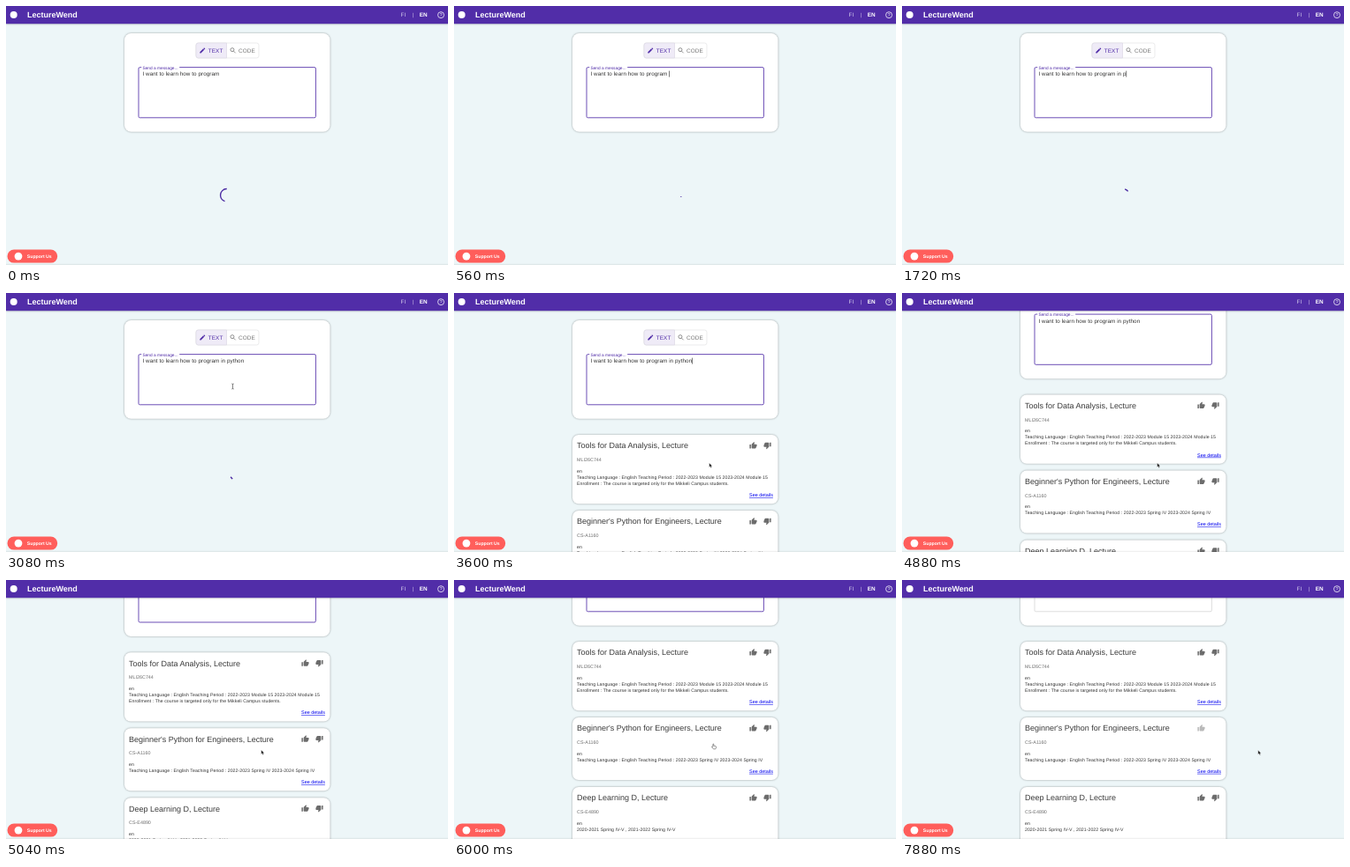
Recreate the animation shown at these times as an HTML page. Size 500x294 px, loop 8 s.

```html
<!DOCTYPE html>
<html lang="en">
<head>
<meta charset="utf-8">
<title>LectureWend</title>
<style>
  html, body { margin: 0; width: 100%; height: 100%; overflow: hidden; background: #edf6f8; }
  svg { display: block; width: 500px; height: 294px; }
  text { font-family: "Liberation Sans", Arial, sans-serif; text-rendering: geometricPrecision; white-space: pre; }
  .paper { fill: #fff; filter: drop-shadow(0 .8px 1.1px rgba(0, 0, 0, .36)); }
  .bold { font-weight: bold; }
  .spaced { letter-spacing: .0094em; }
</style>
</head>
<body>
<svg id="stage" viewBox="0 0 500 294" xmlns="http://www.w3.org/2000/svg"></svg>
<script>
const LOOP = 8000;
const PURPLE = '#512da8';
const GREY = '#6c6c6c';

const PENCIL = 'M3 17.25V21h3.75L17.81 9.94l-3.75-3.75L3 17.25zM20.71 7.04c.39-.39.39-1.02 0-1.41l-2.34-2.34c-.39-.39-1.02-.39-1.41 0l-1.83 1.83 3.75 3.75 1.83-1.83z';
const THUMB = 'M1 21h4V9H1v12zm22-11c0-1.1-.9-2-2-2h-6.31l.95-4.57.03-.32c0-.41-.17-.79-.44-1.06L14.17 1 7.59 7.59C7.22 7.95 7 8.45 7 9v10c0 1.1.9 2 2 2h9c.83 0 1.54-.5 1.84-1.22l3.02-7.05c.09-.23.14-.47.14-.73v-2z';
const SEARCH = 'M3.5 9.5a6 6 0 1 0 12 0a6 6 0 1 0-12 0M14 14l6.5 6.5';

// Markup helpers
const text = (x, y, size, fill, str, extra = '') =>
  `<text x="${x}" y="${y}" font-size="${size}" fill="${fill}" ${extra}>${str}</text>`;
const rect = (x, y, w, h, extra) =>
  `<rect x="${x}" y="${y}" width="${w}" height="${h}" ${extra}/>`;
const icon = (d, cx, cy, size, attrs, turn = 0) =>
  `<path d="${d}" ${attrs} transform="translate(${cx} ${cy}) rotate(${turn}) scale(${size / 24}) translate(-12 -12)"/>`;

const courses = [
  { y: 161, h: 78.3, title: 'Tools for Data Analysis, Lecture', code: 'MLI26C744',
    lines: ['Teaching Language : English Teaching Period : 2022-2023 Module 15 2023-2024 Module 15',
            'Enrollment : The course is targeted only for the Mikkeli Campus students.'] },
  { y: 247, h: 71, title: "Beginner's Python for Engineers, Lecture", code: 'CS-A1160',
    lines: ['Teaching Language : English Teaching Period : 2022-2023 Spring IV 2023-2024 Spring IV'] },
  { y: 326, h: 71, title: 'Deep Learning D, Lecture', code: 'CS-E4890',
    lines: ['2020-2021 Spring IV-V , 2021-2022 Spring IV-V'] },
];

function courseCard({ y, h, title, code, lines }, i) {
  const body = ['en', ...lines].map((line, n) =>
    text(139, y + 42.9 + n * 6.95, 5.18, '#333', line, 'letter-spacing=".055"')).join('');
  return rect(134, y, 232.5, h, 'rx="7" class="paper"')
    + text(139, y + 15.4, 9, '#3a3a3a', title)
    + text(139, y + 30, 5.4, GREY, code)
    + body
    + text(334, y + h - 8.2, 5.45, '#0000ee', 'See details', 'text-decoration="underline"')
    + icon(THUMB, 338.5, y + 12.2, 9, `id="up${i}" fill="${GREY}"`)
    + icon(THUMB, 354.5, y + 12.2, 9, `id="down${i}" fill="${GREY}"`, 180);
}

const form =
  rect(134, 31, 232.5, 111.8, 'rx="7.5" class="paper"')
  + rect(215, 42, 71, 17, 'rx="2.5" fill="#fff" stroke="#e2e2e4" stroke-width=".7"')
  + `<path d="M249.5 42H217.5a2.5 2.5 0 0 0-2.5 2.5v12a2.5 2.5 0 0 0 2.5 2.5h32z" fill="#efebf7" stroke="#dcd8e4" stroke-width=".7"/>`
  + icon(PENCIL, 222.3, 50.5, 8, `fill="${PURPLE}"`)
  + text(228.7, 52.9, 6.4, PURPLE, 'TEXT', 'letter-spacing=".1"')
  + icon(SEARCH, 256.8, 50.5, 8, 'fill="none" stroke="#777" stroke-width="2.4"')
  + text(263, 52.9, 6.4, '#757575', 'CODE', 'letter-spacing=".1"')
  + rect(150, 69.6, 200.4, 57.2, 'id="field" rx="1.5" fill="none"')
  + rect(153.2, 68.6, 43, 2.2, 'fill="#fff"')
  + text(154.5, 71.7, 4.8, PURPLE, 'Send a message...', 'id="label"')
  + text(154.5, 79.1, 6.3, '#333', '', 'id="message" class="spaced"')
  + rect(0, 73.6, .6, 7, 'id="caret" fill="#222"');

const chrome =
  rect(0, 292.7, 500, 1.3, 'fill="#000" opacity=".06"')
  + rect(0, -2, 500, 22.2, `fill="${PURPLE}" style="filter:drop-shadow(0 .5px .8px rgba(0,0,0,.35))"`)
  + '<circle cx="8.7" cy="10" r="4" fill="#fff"/>'
  + text(24, 13.2, 9, '#fff', 'LectureWend', 'class="bold"')
  + text(446.6, 12.3, 6.3, '#d6cdec', 'FI')
  + text(459.8, 12, 5.8, '#d6cdec', '|')
  + text(467.8, 12.3, 6.4, '#fff', 'EN', 'class="bold"')
  + '<circle cx="492" cy="10.2" r="3.5" fill="none" stroke="#fff" stroke-width=".75"/>'
  + text(492, 12.2, 5.4, '#fff', '?', 'text-anchor="middle"')
  + rect(1.5, 276.6, 56.7, 15, 'rx="7.5" fill="#ff5e5b"')
  + '<circle cx="14" cy="284.1" r="4.4" fill="#fff"/>'
  + text(23.8, 286, 5.2, '#fff', 'Support Us', 'class="bold"');

const spinner = `<circle id="spinner" r="20.2" fill="none" stroke="#4a2aa2" stroke-width="3.8"/>`;

const cursors =
  '<path id="beam" d="M-1.2-3Q0-3 0-2.3Q0-3 1.2-3M0-2.3V2.3M-1.2 3Q0 3 0 2.3Q0 3 1.2 3" fill="none" stroke="#333" stroke-width=".6"/>'
  + '<path id="arrow" d="M0 0V4.8L1.1 3.8L1.9 5.5L2.8 5.1L2 3.5H3.5Z" fill="#111" stroke="#fff" stroke-width=".35"/>'
  + '<path id="hand" d="M-.9-3q.6 0 .6.6v1.6l2.2.5q.7.2.6.9l-.4 1.7q-.1.6-.7.6h-2l-2.1-2.4.5-.6 1 .5v-2.8q0-.6.3-.6z" fill="#fff" stroke="#444" stroke-width=".55"/>';

document.getElementById('stage').innerHTML =
  rect(0, 0, 500, 294, 'fill="#edf6f8"')
  + `<g id="page">${form}<g id="results">${courses.map(courseCard).join('')}</g>${spinner}</g>`
  + chrome + cursors;

const $ = id => document.getElementById(id);
const set = (id, attrs) => { for (const k in attrs) $(id).setAttribute(k, attrs[k]); };
const show = (id, on) => set(id, { visibility: on ? 'visible' : 'hidden' });
const clamp = x => Math.min(1, Math.max(0, x));
const smooth = x => x * x * (3 - 2 * x);
const span = (t, a, b) => clamp((t - a) / (b - a));
const mix = (a, b, k) => a + (b - a) * k;

const BASE = 'I want to learn how to program';
const TAIL = ' in python';
const keys = [520, 720, 880, 1040, 1640, 1800, 1920, 2080, 2320, 2480];
const LAST_KEY = keys[keys.length - 1];
const BLUR = 6880, VOTED = 7000;

function drawField(t) {
  const typed = keys.filter(k => k <= t).length;
  const str = BASE + TAIL.slice(0, typed);
  const msg = $('message');
  if (msg.textContent !== str) msg.textContent = str;
  const blink = t < LAST_KEY || Math.floor((t - LAST_KEY) / 480) % 2 === 0;
  show('caret', typed > 0 && blink && t < BLUR);
  set('caret', { x: 154.5 + msg.getComputedTextLength() });
  const focus = t < BLUR;
  set('field', { stroke: focus ? PURPLE : '#c6c6c6', 'stroke-width': focus ? .85 : .6 });
  set('label', { fill: focus ? PURPLE : GREY });
}

// Rotating arc whose dash grows, then runs off the end of the circle
function drawSpinner(t) {
  const start = t < 520 ? -1000 : 518;
  const p = (t - start) / 1335 % 1;
  const grow = smooth(clamp(p * 2)), run = smooth(clamp(p * 2 - 1));
  set('spinner', {
    transform: `translate(249.8 214.7) rotate(${p * 360}) scale(.358)`,
    'stroke-dasharray': `${1 + 99 * grow} 200`,
    'stroke-dashoffset': -(15 * grow + 110 * run),
  });
}

function pointer(t) {
  if (t < 2760) return null;
  if (t < 3100) {
    const k = smooth(span(t, 2760, 3060));
    return ['beam', mix(205, 256.5, k), mix(100, 106, k)];
  }
  if (t < 5440) {
    const k = smooth(span(t, 3100, 3600));
    const y = mix(106, 193, k);
    return [y < 127 ? 'beam' : 'arrow', mix(256.5, 288.7, k), y];
  }
  if (t < 6000) return ['hand', 289.5, 196];
  if (t < 7620) {
    const k = smooth(span(t, 5980, 6640));
    return ['hand', mix(294, 340, k), mix(189, 168.3, k)];
  }
  const k = smooth(span(t, 7570, 7880));
  return ['arrow', mix(339, 402.8, k), mix(166, 193.3, k)];
}

function drawPointer(t) {
  const p = pointer(t);
  for (const id of ['beam', 'arrow', 'hand']) show(id, p && p[0] === id);
  if (p) set(p[0], { transform: `translate(${p[1]} ${p[2]})` });
}

function draw(t) {
  const loading = t < 160 || (t >= 520 && t < 3320);
  show('results', !loading);
  show('spinner', loading);
  drawSpinner(t);
  drawField(t);
  const scroll = 91 * Math.sin(span(t, 4720, 5200) * Math.PI / 2);
  set('page', { transform: `translate(0 ${-scroll})` });
  const voted = t >= VOTED;
  set('up1', { fill: voted ? '#b9b9b9' : GREY });
  set('down1', { opacity: voted ? 0 : 1 });
  drawPointer(t);
}

let origin;
function tick(now) {
  origin ??= now;
  draw((now - origin) % LOOP);
  requestAnimationFrame(tick);
}
draw(0);
requestAnimationFrame(tick);
</script>
</body>
</html>
```
